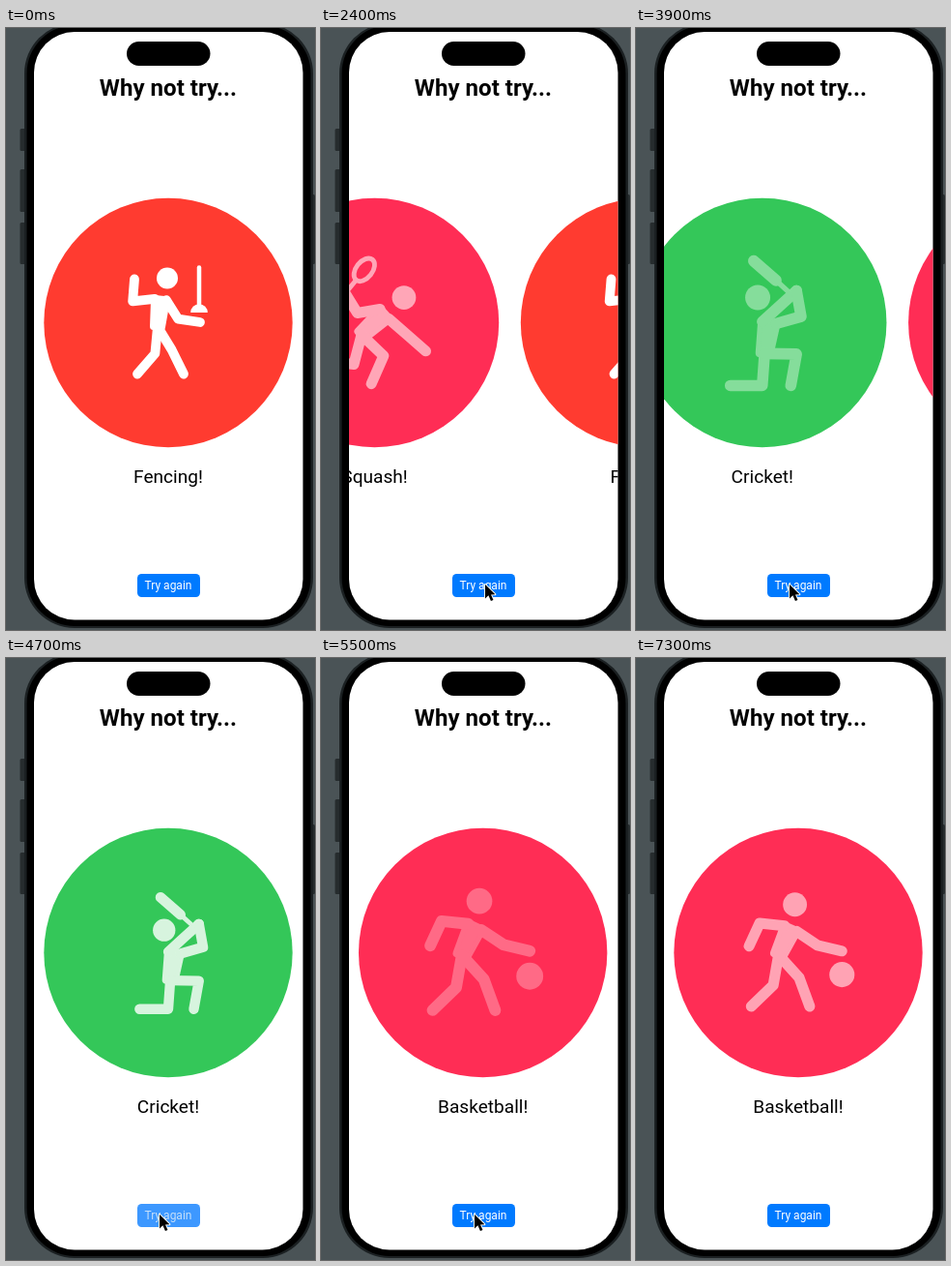
These frames come from a looping animation (320 by 622 pixels, 7400 ms). An HTML page with a canvas:

```html
<!DOCTYPE html>
<html lang="en">
<head>
<meta charset="utf-8">
<title>Why not try...</title>
<style>
html, body { margin: 0; width: 100%; height: 100%; overflow: hidden; background: #4a5356; }
canvas { display: block; width: 320px; height: 622px; }
</style>
</head>
<body>
<canvas id="stage"></canvas>
<script>
const LOOP = 7400, STEP = 100;
const W = 320, H = 622, CX = 168, CY = 304.5, PAGE = 280, RADIUS = 128.7;
const ARM = 23, LEG = 28, LIMB = 9.8;
const FONT = 'Roboto, Inter, Arial, sans-serif';
const RED = [255, 59, 48], PINK = [255, 45, 85], GREEN = [52, 199, 89];

const canvas = document.getElementById('stage');
const ctx = canvas.getContext('2d');
const dpr = window.devicePixelRatio || 1;
canvas.width = W * dpr;
canvas.height = H * dpr;

// Each arm is [hand x, hand y, bend]; joints are measured from the circle's centre
const cards = [
  {
    name: 'Fencing!', rgb: RED, start: -Infinity, prop: sword,
    head: [-1, -46], shoulder: [-8, -24], hip: [-11, 4],
    arms: [[-35, -45, -1], [33, -0.5, 1]], feet: [[-32, 53], [16, 53]]
  },
  {
    name: 'Squash!', rgb: PINK, start: 2240, prop: racket,
    head: [27, -23], shoulder: [9, -8], hip: [-12, 11],
    arms: [[-27, -27, -0.8], [47, 26, 0]], feet: [[-47, 36], [-3, 56]]
  },
  {
    name: 'Cricket!', rgb: GREEN, start: 3620, prop: bat,
    head: [-4, -22], shoulder: [6, 0], hip: [2, 27],
    arms: [[30, -28, 0], [30, -28, 1]], feet: [[-28, 55], [25, 55]]
  },
  {
    name: 'Basketball!', rgb: PINK, start: 4780, prop: ball,
    head: [-3, -44], shoulder: [-7, -22], hip: [-18, 2],
    arms: [[-45, -6, 1], [40, -1.5, 1]], feet: [[-43, 49], [10.5, 49]]
  }
];

function line(width, ...points) {
  ctx.lineWidth = width;
  ctx.beginPath();
  points.forEach(p => ctx.lineTo(p[0], p[1]));
  ctx.stroke();
}

function dot(x, y, r) {
  ctx.beginPath();
  ctx.arc(x, y, r, 0, Math.PI * 2);
  ctx.fill();
}

function box(x, y, w, h, r, color) {
  ctx.fillStyle = color;
  ctx.beginPath();
  ctx.roundRect(x, y, w, h, r);
  ctx.fill();
}

function label(text, y, size, color, weight = 400) {
  ctx.font = `${weight} ${size}px ${FONT}`;
  ctx.fillStyle = color;
  ctx.textAlign = 'center';
  ctx.fillText(text, CX, y);
}

// Two equal segments; the middle joint follows from the reach
function limb(a, b, length, bend) {
  const dx = b[0] - a[0], dy = b[1] - a[1], d = Math.hypot(dx, dy);
  const k = bend * Math.sqrt(Math.max(0, length * length - d * d / 4)) / d;
  line(LIMB, a, [(a[0] + b[0]) / 2 - dy * k, (a[1] + b[1]) / 2 + dx * k], b);
}

function figure({ head, shoulder, hip, arms, feet, prop }) {
  const dx = hip[0] - shoulder[0], dy = hip[1] - shoulder[1], d = Math.hypot(dx, dy);
  const beside = (p, w) => [p[0] + dy / d * w, p[1] - dx / d * w];
  const sides = [beside(shoulder, -6), beside(shoulder, 6)];
  dot(...head, 11);
  line(8, ...sides, beside(hip, 4), beside(hip, -4), sides[0]);
  ctx.fill();
  arms.forEach((arm, i) => limb(sides[i], arm, ARM, arm[2]));
  feet.forEach(foot => limb(hip, foot, LEG, -1));
  prop();
}

function sword() {
  line(4.5, [32, -57], [32, -16]);
  ctx.beginPath();
  ctx.arc(32, -10.5, 8.8, Math.PI, 0);
  ctx.fill();
}

function racket() {
  ctx.lineWidth = 4.3;
  ctx.beginPath();
  ctx.ellipse(-9.5, -48.5, 12, 7.5, -0.9, 0, Math.PI * 2);
  ctx.stroke();
  line(4.3, [-27, -27], [-17, -39]);
}

function bat() {
  line(10, [-7.5, -54], [12, -37]);
  line(4.5, [12, -37], [22, -28]);
}

function ball() {
  dot(40, 20, 11.5);
}

// Icon opacity swings between 1 and 0.2 once a card has been dealt
function opacityAt(card, t) {
  if (card.start === -Infinity) return 1;
  return 0.6 + 0.4 * Math.cos(1 + (t - card.start) / 1600 * Math.PI * 2);
}

// Critically damped spring
function arrival(card, t) {
  if (card.start === -Infinity) return 1;
  const x = Math.max(0, t - card.start) * 0.0126;
  return 1 - (1 + x) * Math.exp(-x);
}

function drawCard(card, t, shift) {
  const alpha = opacityAt(card, t);
  const scale = 1.3 - 0.3 * alpha;
  const tint = card.rgb.map(v => Math.round(v + (255 - v) * alpha));
  ctx.save();
  ctx.translate(shift, 0);
  ctx.fillStyle = `rgb(${card.rgb})`;
  dot(CX, CY, RADIUS);
  label(card.name, 470, 19.1, '#000');
  ctx.translate(CX, CY);
  ctx.scale(scale, scale);
  ctx.fillStyle = ctx.strokeStyle = `rgb(${tint})`;
  ctx.lineCap = ctx.lineJoin = 'round';
  figure(card);
  ctx.restore();
}

function drawPhone() {
  ctx.fillStyle = '#4a5356';
  ctx.fillRect(0, 0, W, H);
  box(14.5, 104, 6, 23, 1.5, '#262c2e');
  box(14.5, 146, 6, 44, 1.5, '#262c2e');
  box(14.5, 201, 6, 43, 1.5, '#262c2e');
  box(316, 172, 4, 72, 1.5, '#262c2e');
  box(19, -5, 299, 625, 52, '#1b2022');
  box(21.5, -3, 294, 621, 50, '#000');
  box(29, 4, 278.5, 607.5, 42, '#fff');
}

function ramp(t, from, to) {
  const u = Math.min(1, Math.max(0, (t - from) / (to - from)));
  return u * u * (3 - 2 * u);
}

function drawCursor(t) {
  const enter = ramp(t, 800, 1600), nudge = ramp(t, 2700, 3000), leave = ramp(t, 5700, 6400);
  ctx.save();
  ctx.translate(332 - 162 * enter - 11 * nudge + 173 * leave, 470 + 105 * enter - 35 * leave);
  ctx.scale(0.9, 0.9);
  ctx.fillStyle = '#000';
  ctx.strokeStyle = '#fff';
  ctx.lineWidth = 2;
  ctx.lineJoin = 'round';
  const arrow = new Path2D('M0 0V16L3.8 12.6 6.6 19 9.4 17.8 6.7 11.6 11.6 11.4Z');
  ctx.stroke(arrow);
  ctx.fill(arrow);
  ctx.restore();
}

function draw(t) {
  ctx.setTransform(dpr, 0, 0, dpr, 0, 0);
  drawPhone();

  ctx.save();
  ctx.beginPath();
  ctx.roundRect(29, 4, 278.5, 607.5, 42);
  ctx.clip();
  cards.forEach((card, i) => {
    const next = cards[i + 1];
    const gone = next ? arrival(next, t) : 0;
    if (t >= card.start && gone < 0.999)
      drawCard(card, t, PAGE * (arrival(card, t) - 1 + gone));
  });
  ctx.restore();

  box(125, 14, 86.5, 25, 12.5, '#000');
  label('Why not try...', 70, 24.1, '#000', 700);

  // The button is held just before each new card
  const held = cards.some(({ start }) => t < start && t >= start - 220);
  box(136, 564, 65, 24, 4.5, held ? '#3d98ff' : '#007aff');
  label('Try again', 580.3, 12, held ? '#c5dffa' : '#fff');
  drawCursor(t);
}

const begin = performance.now();
function tick() {
  const t = (performance.now() - begin) % LOOP;
  draw(Math.floor(t / STEP) * STEP);
  requestAnimationFrame(tick);
}
tick();
</script>
</body>
</html>
```
